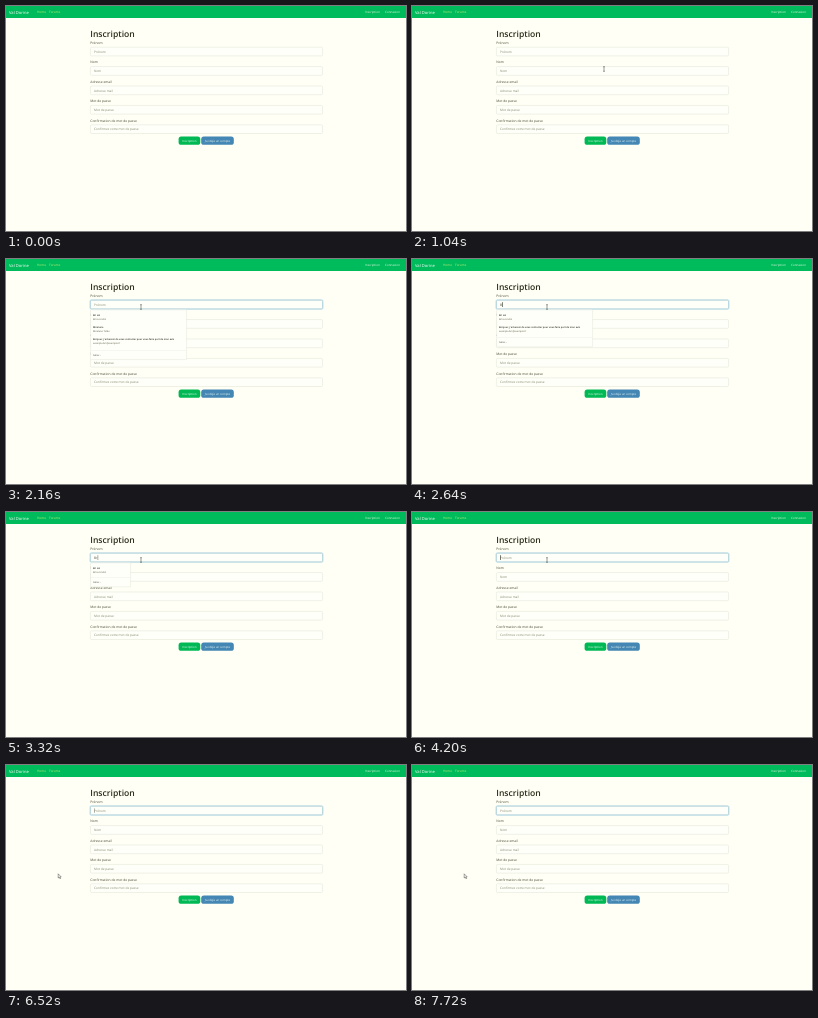
These frames come from a looping animation (400 by 225 pixels, 8 s). An HTML page:

```html
<!DOCTYPE html>
<html lang="fr">
<head>
<meta charset="utf-8">
<title>Inscription</title>
<style>
html, body { margin: 0; width: 100%; height: 100%; overflow: hidden; background: #fffff6; }
svg { display: block; width: 100vw; height: 100vh; }
text { font-family: "Open Sans", "Noto Sans", sans-serif; }
</style>
</head>
<body>
<svg id="stage" viewBox="0 0 400 225" text-rendering="geometricPrecision"></svg>
<script>
const LOOP = 8000, STEP = 40;
const stage = document.getElementById("stage");

function add(parent, tag, attrs, content) {
  const el = document.createElementNS("http://www.w3.org/2000/svg", tag);
  for (const key in attrs) el.setAttribute(key, attrs[key]);
  if (content) el.textContent = content;
  parent.appendChild(el);
  return el;
}
const rect = (p, x, y, width, height, fill, more) =>
  add(p, "rect", { x, y, width, height, fill, ...more });
const label = (p, x, y, size, fill, content, more) =>
  add(p, "text", { x, y, "font-size": size, fill, ...more }, content);
const show = (el, on) => el.setAttribute("visibility", on ? "visible" : "hidden");

// Page
rect(stage, 0, 0, 400, 225, "#fffff6");
rect(stage, 0, 0, 400, 12, "#00bb5b");
label(stage, 3, 7.6, 4.1, "#fff", "Val Dorine");
label(stage, 31, 7.4, 3.2, "#b5ee74", "Home");
label(stage, 43, 7.4, 3.2, "#b5ee74", "Forums");
label(stage, 359, 7.4, 3, "#e9fbe8", "Inscription");
label(stage, 379, 7.4, 3, "#e9fbe8", "Connexion");
label(stage, 84.3, 31, 8.6, "#2b2d18", "Inscription", { "font-weight": 600 });

const fields = [
  ["Prénom", "Prénom"],
  ["Nom", "Nom"],
  ["Adresse email", "Adresse mail"],
  ["Mot de passe", "Mot de passe"],
  ["Confirmation de mot de passe", "Confirmez votre mot de passe"]
];
const hints = fields.map(([name, hint], i) => {
  const y = 19.4 * i;
  label(stage, 84.3, 38 + y, 3.3, "#45472f", name);
  rect(stage, 84.4, 41.2 + y, 232.2, 8.7, "#fffffa",
    { rx: 1.1, stroke: "#dfe2d3", "stroke-width": 0.5 });
  return label(stage, 88, 46.8 + y, 3.2, "#85896c", hint);
});

function button(x, width, fill, content) {
  rect(stage, x, 130.6, width, 8.2, fill, { rx: 2.6 });
  label(stage, x + width / 2, 135.8, 2.9, "#effbf2", content, { "text-anchor": "middle" });
}
button(172.6, 21.7, "#00b955", "Inscription");
button(195.2, 32.6, "#4486b4", "J'ai déjà un compte");

// Focused field
const focus = add(stage, "g", {});
rect(focus, 83.9, 40.7, 233.2, 9.7, "none",
  { rx: 1.5, stroke: "#d3e9ee", "stroke-width": 0.9 });
rect(focus, 84.4, 41.2, 232.2, 8.7, "none",
  { rx: 1.1, stroke: "#98c5d8", "stroke-width": 0.6 });
const typed = label(stage, 88, 46.8, 3.2, "#40432f", "");
const caret = rect(stage, 88, 43.2, 0.6, 4.8, "#2b2d20");

// Suggestion lists
const people = [
  ["Bri sol", "Brisa Lindol"],
  ["Mirelune", "Mirelune Tolbe"],
  ["Bonjour, j'ai besoin de vous contacter pour vous faire part de mon avis", "exemple.bri@exemple.fr"]
];
function menu(width, height, picks, rows) {
  const g = add(stage, "g", {});
  rect(g, 84.6, 50.8, width, height, "#fffffa",
    { rx: 0.6, stroke: "#e3e5d9", "stroke-width": 0.5 });
  picks.forEach((pick, i) => {
    label(g, 87, rows[i], 2.4, "#282b1c", people[pick][0], { "font-weight": 600 });
    label(g, 87, rows[i] + 3.9, 2.4, "#55583f", people[pick][1]);
  });
  const end = 50.8 + height;
  rect(g, 85, end - 9.5, width - 0.8, 0.3, "#e3e5d9");
  label(g, 87, end - 4, 2.4, "#40432f", "Gérer...");
  return g;
}
const menus = {
  all: menu(96, 49.8, [0, 1, 2], [57.2, 69.1, 81]),
  two: menu(96, 37, [0, 2], [57.2, 69.1]),
  one: menu(40, 24, [0], [57.2])
};

// Pointers
const beam = add(stage, "path", {
  d: "M-1-2.4Q0-2.4 0-1.9Q0-2.4 1-2.4M0-1.9V1.9M-1 2.4Q0 2.4 0 1.9Q0 2.4 1 2.4",
  fill: "none", stroke: "#55584a", "stroke-width": 0.6
});
const arrow = add(stage, "path", {
  d: "M0 0V4.2L1 3.3L1.7 4.9L2.4 4.6L1.7 3.1H3Z",
  fill: "#fff", stroke: "#34362b", "stroke-width": 0.45
});

const path = [
  [880, 382, 137], [960, 288, 92], [1040, 192, 63], [1200, 158, 56],
  [1440, 135, 48], [4360, 135, 48], [4560, 116, 62], [4800, 75, 95], [5040, 52.2, 108.8]
];
function pointAt(t) {
  if (t >= path[path.length - 1][0]) return path[path.length - 1].slice(1);
  const i = path.findIndex(p => p[0] > t);
  const [t0, x0, y0] = path[i - 1], [t1, x1, y1] = path[i];
  const k = (t - t0) / (t1 - t0);
  return [x0 + (x1 - x0) * k, y0 + (y1 - y0) * k];
}

// [start, typed text, open list]
const edits = [
  [1520, "", "all"], [2560, "B", "two"], [2760, "Br", "one"],
  [3680, "B", "two"], [3840, "", ""]
];
const BLINK = 525, FADE = 100;
function caretAt(since) {
  const phase = since % (2 * BLINK);
  const k = Math.min(1, (phase % BLINK) / FADE);
  if (phase >= BLINK) return 1 - k;
  return since < BLINK ? 1 : k;
}

function draw(time) {
  const t = Math.floor(time % LOOP / STEP) * STEP;
  const edit = edits.filter(e => e[0] <= t).pop();
  const content = edit ? edit[1] : "";
  show(focus, edit);
  show(caret, edit);
  show(hints[0], !content);
  typed.textContent = content;
  for (const name in menus) show(menus[name], edit && edit[2] === name);
  if (edit) {
    caret.setAttribute("x", 88 + [0, 2.2, 3.6][content.length]);
    caret.setAttribute("opacity", caretAt(t - edit[0]));
  }

  const visible = t >= path[0][0];
  const [x, y] = visible ? pointAt(t) : [0, 0];
  const row = (y - 41) % 19.4;
  const overField = x > 84 && x < 317 && y > 41 && y < 128 && row < 9;
  show(beam, visible && overField);
  show(arrow, visible && !overField);
  for (const el of [beam, arrow]) el.setAttribute("transform", `translate(${x} ${y})`);
}

const start = performance.now();
function tick() {
  draw(performance.now() - start);
  requestAnimationFrame(tick);
}
tick();
</script>
</body>
</html>
```
